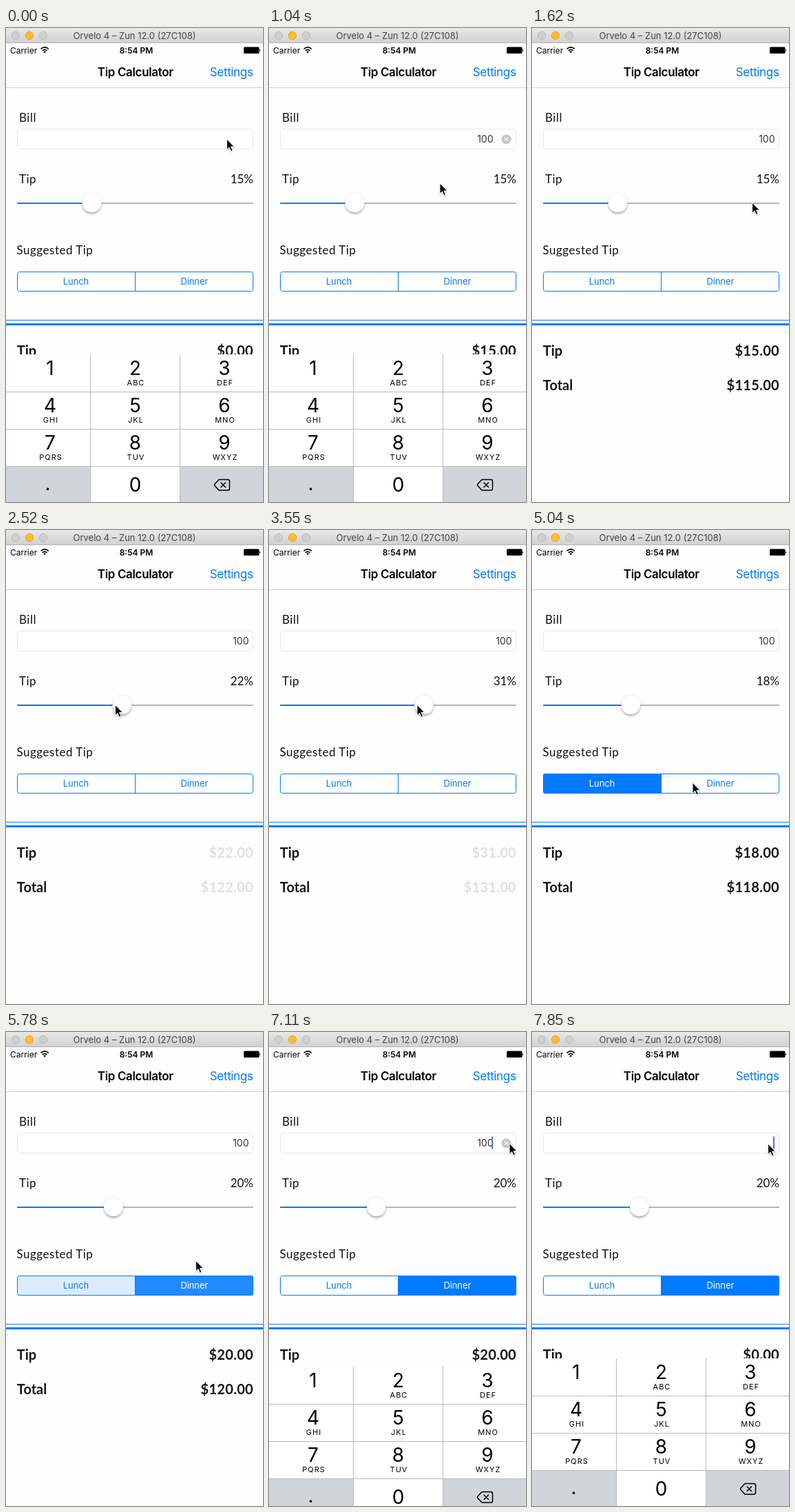
Animation, 373 px wide and 687 px high, one loop 8 s. Source, as an HTML page:

```html
<!DOCTYPE html>
<html lang="en">
<head>
<meta charset="utf-8">
<title>Tip Calculator</title>
<style>
  html, body { margin: 0; width: 100%; height: 100%; overflow: hidden; background: #fefefe; }
  svg { display: block; width: 100%; height: 100%; }
  text { font-family: Inter, Roboto, sans-serif; fill: #000; white-space: pre; }
  .mid { text-anchor: middle; }
  .end { text-anchor: end; }
  .label { font: 17px Lato, "Open Sans", sans-serif; fill: #111; }
  .wide { letter-spacing: .5px; }
  .sum { font: 700 20px Lato, "Open Sans", sans-serif; fill: #151515; }
  .money { letter-spacing: .3px; }
  .nav { font-size: 17px; letter-spacing: -.35px; }
  .status { font-size: 12px; }
  .bold { font-weight: 600; }
  .blue { fill: #007aff; }
  .seg { font-size: 13px; letter-spacing: -.1px; }
  .digit { font-size: 28px; }
  .letters { font-size: 11px; letter-spacing: 1px; }
</style>
</head>
<body>
<svg viewBox="0 0 373 687" preserveAspectRatio="none">
  <defs>
    <linearGradient id="chrome" x2="0" y2="1">
      <stop stop-color="#e9e8e9"/><stop offset="1" stop-color="#d1d0d1"/>
    </linearGradient>
    <filter id="knobShadow" x="-50%" y="-50%" width="200%" height="200%">
      <feDropShadow dx="0" dy="2.5" stdDeviation="1.8" flood-opacity=".3"/>
    </filter>
    <filter id="pointerShadow" x="-50%" y="-50%" width="200%" height="200%">
      <feDropShadow dx="0" dy="1" stdDeviation=".8" flood-opacity=".3"/>
    </filter>
    <clipPath id="segClip"><rect x="16" y="353" width="343" height="29" rx="3.5"/></clipPath>
  </defs>
  <rect width="373" height="687" fill="#fefefe"/>

  <!-- window chrome -->
  <rect width="373" height="22" fill="url(#chrome)"/>
  <path d="M0 21.5H373" stroke="#b5b4b5"/>
  <g fill="#d0cfd0" stroke="#bcbbbc">
    <circle cx="14" cy="11" r="5.7"/>
    <circle cx="34" cy="11" r="5.7" fill="#fdbd2e" stroke="#e4a526"/>
    <circle cx="54" cy="11" r="5.7"/>
  </g>
  <text class="mid" x="186.5" y="16" font-size="13" style="fill:#454545">Orvelo 4 – Zun 12.0 (27C108)</text>

  <!-- status and navigation bars -->
  <text class="status" x="6" y="36.5">Carrier</text>
  <g fill="none" stroke="#000" stroke-width="1.8">
    <path d="M50.6 30.4Q56.2 25.4 61.8 30.4M52.8 32.9Q56.2 29.9 59.6 32.9"/>
    <path d="M54.3 34.2Q56.2 32.6 58.1 34.2L56.2 36.4Z" fill="#000" stroke="none"/>
  </g>
  <text class="status bold mid" x="189" y="36.5">8:54 PM</text>
  <rect x="345" y="27.5" width="22.5" height="9.5" rx="1.6"/>
  <path d="M368 30.4q2 1.9 0 3.8z"/>
  <text class="nav bold mid" x="187.7" y="70">Tip Calculator</text>
  <text class="nav blue end" x="358.5" y="70">Settings</text>
  <path d="M0 86.5H373" stroke="#d2d2d3"/>

  <!-- bill -->
  <text class="label wide" x="19" y="136">Bill</text>
  <rect x="16.5" y="146.5" width="342" height="29" rx="4.5" fill="#fff" stroke="#e6e6e6"/>
  <text id="bill" class="end" y="166" font-size="14" style="fill:#333"></text>
  <rect id="caret" y="151.5" width="2" height="18" fill="#5470e0"/>
  <g id="clear">
    <circle cx="344.5" cy="161.3" r="7" fill="#c8c8cc"/>
    <path d="M342 158.8l5 5m0-5l-5 5" stroke="#fff" stroke-width="1.2"/>
  </g>

  <!-- slider -->
  <text class="label wide" x="19" y="225">Tip</text>
  <text id="percent" class="label end" x="359" y="225"></text>
  <rect x="16" y="253" width="343" height="2" rx="1" fill="#b6b6b7"/>
  <rect id="fill" x="16" y="253" height="2" rx="1" class="blue"/>
  <circle id="knob" cy="253" r="14" fill="#fff" stroke="#000" stroke-opacity=".09" stroke-width=".6" filter="url(#knobShadow)"/>

  <!-- segmented control -->
  <text class="label wide" x="15.5" y="327.5">Suggested Tip</text>
  <g clip-path="url(#segClip)" class="blue">
    <rect id="lunch" x="16" y="353" width="171.5" height="29"/>
    <rect id="dinner" x="187.5" y="353" width="171.5" height="29"/>
  </g>
  <rect x="16.5" y="353.5" width="342" height="28" rx="3" fill="none" stroke="#007aff"/>
  <path d="M187.5 353V382" stroke="#007aff"/>
  <text id="lunchText" class="seg mid" x="101.5" y="372">Lunch</text>
  <text id="dinnerText" class="seg mid" x="273.3" y="372">Dinner</text>

  <!-- totals -->
  <path d="M0 423.5H373" stroke="#007aff"/>
  <rect y="428" width="373" height="3" class="blue"/>
  <text class="sum" x="15.8" y="475">Tip</text>
  <text class="sum" x="15.8" y="525">Total</text>
  <text id="tip" class="sum money end" x="359" y="475"></text>
  <text id="total" class="sum money end" x="359" y="525"></text>

  <g id="keypad"></g>
  <path id="pointer" d="M0 0V15.2L3.5 11.9L5.9 17.6L8.4 16.5L6 11H10.8Z" stroke="#fff" stroke-width="1" filter="url(#pointerShadow)"/>
</svg>
<script>
const $ = id => document.getElementById(id);
const LOOP = 8000, STEPS = 54;

// Moments of the session, in steps
const FOCUS = 3, DISMISS = 11, GRAB = 15, RELEASE = 26, LUNCH = 33, DINNER = 38, REFOCUS = 48, CLEAR = 50;

const ramp = (k, from, to) => Math.min(1, Math.max(0, (k - from) / (to - from)));
const ease = (k, from, to) => { const u = ramp(k, from, to); return u * u * (3 - 2 * u); };

function buildKeypad() {
  const columns = [64, 187.5, 317];
  const letters = ['', 'ABC', 'DEF', 'GHI', 'JKL', 'MNO', 'PQRS', 'TUV', 'WXYZ'];
  let out = `<rect width="373" height="214" fill="#fff"/>
    <path d="M0 162H122.5V216H0zM252.5 162H373V216H252.5z" fill="#d1d4db"/>
    <path d="M0 54.5H373M0 108.5H373M0 162.5H373M122.5 0V216M252.5 0V216" stroke="#b9babd"/>`;
  letters.forEach((word, i) => {
    const x = columns[i % 3], y = 54 * Math.floor(i / 3);
    out += `<text class="digit mid" x="${x}" y="${y + 30}">${i + 1}</text>
      <text class="letters mid" x="${x + 1}" y="${y + 45}">${word}</text>`;
  });
  out += `<text class="digit mid" x="60.5" y="197">.</text>
    <text class="digit mid" x="187.5" y="199">0</text>
    <g fill="none" stroke="#000" stroke-width="1.5" stroke-linejoin="round" stroke-linecap="round">
      <path d="M309 181.5H322Q324.5 181.5 324.5 184V194.5Q324.5 197 322 197H309L302.8 190.3Q302 189.3 302.8 188.3Z"/>
      <path d="M312 186l6.5 6.5m0-6.5l-6.5 6.5"/>
    </g>`;
  $('keypad').innerHTML = out;
}

// The slider is dragged up to 33, then back to 28; the buttons set 18 and 20
function percentAt(k) {
  if (k >= DINNER) return 20;
  if (k >= LUNCH) return 18;
  return Math.round(15 + 18 * ramp(k, GRAB, 20) - 5 * ramp(k, 23, RELEASE));
}

const knobAt = k => 30.3 + 6.28 * percentAt(k);

// Amounts fade back in once the slider rests
function amountAlpha(k) {
  if (k >= LUNCH) return 1;
  let rest = 0;
  while (rest < 2 && percentAt(k - rest) === percentAt(k - rest - 1)) rest++;
  return .12 + .44 * rest;
}

function keypadTop(k) {
  const hidden = k < REFOCUS ? ramp(k, DISMISS - 1, DISMISS) : .06 ** (k - REFOCUS + 1);
  return 473 + 214 * hidden;
}

function pointerAt(k) {
  let x = 320.5, y = 161;
  const glide = (from, to, toX, toY) => {
    const u = ease(k, from, to);
    x += (toX - x) * u;
    y += (toY - y) * u;
  };
  glide(FOCUS, 7, 248, 225);
  glide(7, 10, 319.5, 253);
  glide(DISMISS, GRAB - 1, knobAt(Math.min(k, RELEASE)) - 10, 253.5);
  glide(RELEASE, 30, 107.5, 367);
  glide(LUNCH - 1, 35, 277, 366);
  glide(DINNER, DINNER + 1, 275.5, 331.5);
  glide(DINNER + 1, 42, 364, 220);
  glide(42, 45, 349, 161.5);
  glide(CLEAR, 52, 342.5, 162);
  return [x, y];
}

function setSegment(id, alpha) {
  $(id).style.opacity = alpha;
  $(id + 'Text').style.fill = alpha > .5 ? '#fff' : '#007aff';
}

function draw(k) {
  const percent = percentAt(k), knobX = knobAt(k);
  const bill = k < CLEAR ? '100'.slice(0, Math.max(0, k - FOCUS - 1)) : '';
  const tip = bill * percent / 100;
  const editing = k >= FOCUS && k < DISMISS || k >= REFOCUS;
  const showClear = editing && bill !== '';
  const right = showClear ? 325.5 : 352.5;
  const dinner = ease(k, DINNER - .7, DINNER + 1.5);

  $('bill').textContent = bill;
  $('bill').setAttribute('x', right);
  $('caret').setAttribute('x', right - 2.5);
  $('caret').style.opacity = editing && (k - FOCUS) % 5 < 3 ? 1 : 0;
  $('clear').style.opacity = showClear ? 1 : 0;
  $('percent').textContent = percent + '%';
  $('knob').setAttribute('cx', knobX);
  $('fill').setAttribute('width', knobX - 16);
  setSegment('lunch', ease(k, LUNCH - 2, LUNCH) - dinner);
  setSegment('dinner', dinner);
  $('tip').textContent = '$' + tip.toFixed(2);
  $('total').textContent = '$' + (+bill + tip).toFixed(2);
  $('tip').style.opacity = $('total').style.opacity = amountAlpha(k);
  $('keypad').setAttribute('transform', `translate(0 ${Math.floor(keypadTop(k))})`);
  $('pointer').setAttribute('transform', `translate(${pointerAt(k)})`);
}

const begin = performance.now();
function tick() {
  const t = (performance.now() - begin) % LOOP;
  draw(Math.min(STEPS - 1, Math.floor(t * STEPS / LOOP + .09)));
  requestAnimationFrame(tick);
}
buildKeypad();
tick();
</script>
</body>
</html>
```
